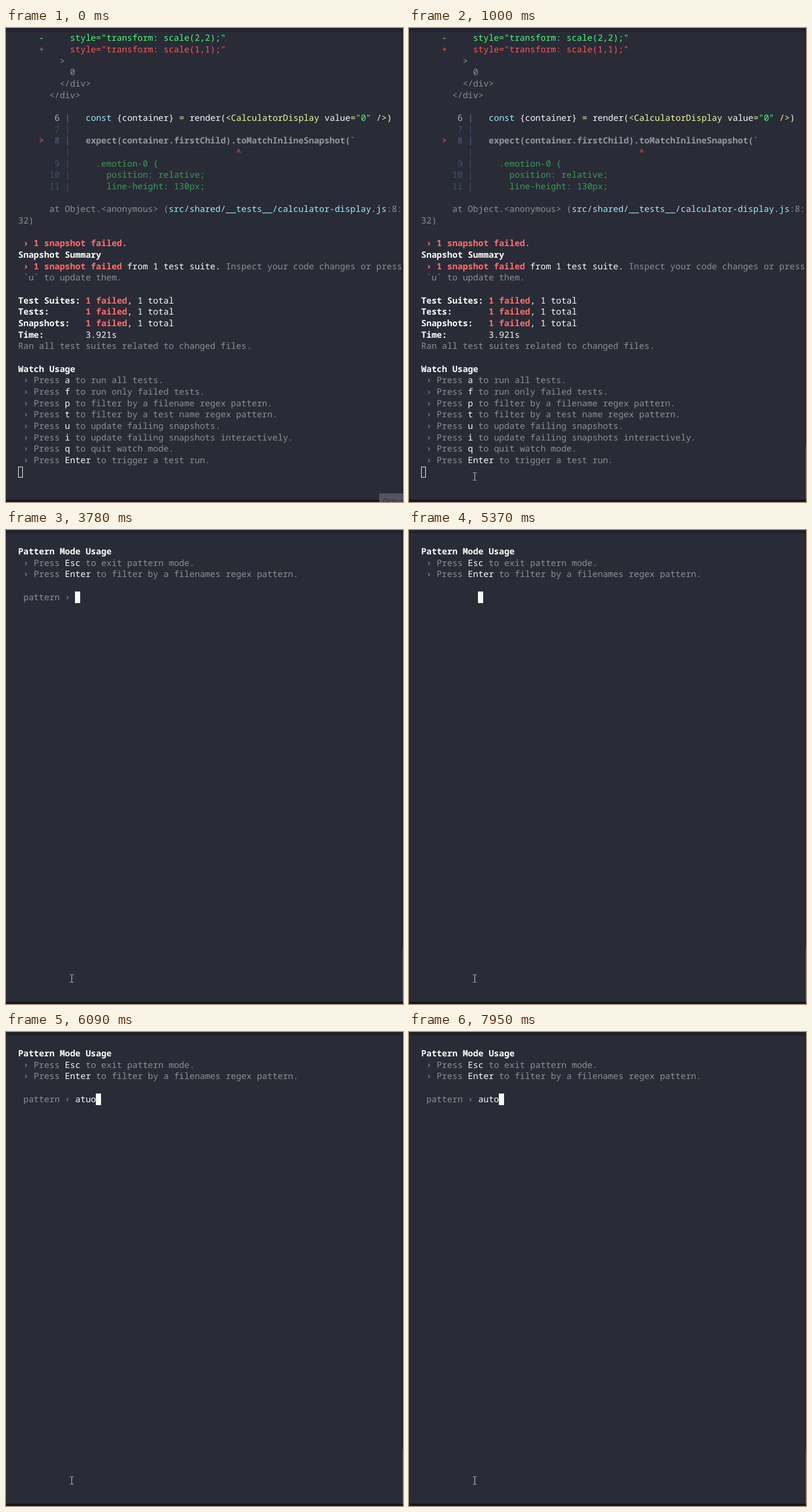
Animation of 685x817 px, one loop 8 s. Source, as an HTML page:

```html
<!DOCTYPE html>
<html lang="en">
<head>
<meta charset="utf-8">
<title>Test watcher</title>
<style>
html, body { margin: 0; width: 100%; height: 100%; overflow: hidden; background: #292b36; }
#stage { position: relative; width: 685px; height: 817px; overflow: hidden; background: #292b36; }
#stage > * { position: absolute; }
pre {
  left: 21px; top: 8.3px; margin: 0; color: #8f9093;
  font: 500 14.93px/19.675px "Noto Sans Mono", "DejaVu Sans Mono", monospace;
  font-variant-ligatures: none; text-rendering: geometricPrecision;
}
i { font-style: normal; color: #fbfbf8; }
b { color: #fff; }
.red { color: #ff5555; }
.fail { color: #ff6e6e; }
.green { color: #50fa7b; }
.leaf { color: #3a9c56; }
.cyan { color: #9aedfe; }
.yellow { color: #f4f99d; }
.mark { color: #b54d4e; }
.grey { color: #97989c; }
.num { color: #aab0c8; }
.dim { color: #434f74; }
.bar { color: #70748a; }
#top { left: 0; top: 0; width: 685px; height: 6px; background: #21222d; }
#right { left: 683px; top: 0; width: 2px; height: 817px; background: #1f202a; }
#bottom { left: 0; top: 813px; width: 685px; height: 4px; background: #181620; }
#thumb { left: 684px; top: 719px; width: 1px; height: 94px; background: #55565f; }
#tip {
  left: 644px; top: 802px; width: 41px; height: 15px; overflow: hidden; box-sizing: border-box;
  background: #54545e; color: #25262e; padding: 4px 0 0 6px;
  font: 13px/18px "Open Sans", sans-serif; white-space: nowrap;
}
#cursor { width: 8.95px; height: 19.675px; box-sizing: border-box; border: 1px solid #f8f8f2; }
#pointer { left: 0; top: 0; }
</style>
</head>
<body>
<div id="stage">
<div id="top"></div>
<pre id="results">
<span class="green">    -     style="transform: scale(2,2);"</span>
<span class="red">    +     style="transform: scale(1,1);"</span>
        &gt;
          0
        &lt;/div&gt;
      &lt;/div&gt;

       <span class="num">6</span> <span class="bar">|</span>   <span class="cyan">const</span> <i>{container}</i> <span class="yellow">=</span> <i>render(</i><span class="yellow">&lt;CalculatorDisplay</span> <i>value</i><span class="yellow">=</span><span class="green">"0"</span> <span class="yellow">/&gt;</span><i>)</i>
<span class="dim">       7 |</span>
    <b class="mark">&gt;</b>  <b class="dim">8 |</b>   <b class="grey">expect(container.firstChild).toMatchInlineSnapshot(</b><b class="leaf">`</b>
<span class="dim">         |</span>                                <b class="mark">^</b>
<span class="dim">       9 |</span>     <span class="leaf">.emotion-0 {</span>
<span class="dim">      10 |</span>       <span class="leaf">position: relative;</span>
<span class="dim">      11 |</span>       <span class="leaf">line-height: 130px;</span>

      at Object.&lt;anonymous&gt; (<span class="cyan">src/shared/__tests__/calculator-display.js</span>:8:
32)

<b class="fail"> › 1 snapshot failed.</b>
<b>Snapshot Summary</b>
<b class="fail"> › 1 snapshot failed</b><i> from 1 test suite.</i> Inspect your code changes or press
 `u` to update them.

<b>Test Suites: <span class="fail">1 failed</span></b><i>, 1 total</i>
<b>Tests:       <span class="fail">1 failed</span></b><i>, 1 total</i>
<b>Snapshots:   <span class="fail">1 failed</span></b><i>, 1 total</i>
<b>Time:        </b><i>3.921s</i>
Ran all test suites related to changed files.

<b>Watch Usage</b>
 › Press <i>a</i> to run all tests.
 › Press <i>f</i> to run only failed tests.
 › Press <i>p</i> to filter by a filename regex pattern.
 › Press <i>t</i> to filter by a test name regex pattern.
 › Press <i>u</i> to update failing snapshots.
 › Press <i>i</i> to update failing snapshots interactively.
 › Press <i>q</i> to quit watch mode.
 › Press <i>Enter</i> to trigger a test run.
</pre>
<pre id="prompt">
&#8203;
<b>Pattern Mode Usage</b>
 › Press <i>Esc</i> to exit pattern mode.
 › Press <i>Enter</i> to filter by a filenames regex pattern.

<span id="entry"> pattern › <i id="typed"></i></span>
</pre>
<div id="cursor"></div>
<div id="right"></div>
<div id="thumb"></div>
<div id="bottom"></div>
<div id="tip">Gravar</div>
<svg id="pointer" width="7" height="14" fill="none" stroke="#d6d6da">
  <path d="M0.5 .5H2.5L3.5 1.5L4.5 .5H6.5M3.5 1V13M0.5 13.5H2.5L3.5 12.5L4.5 13.5H6.5"/>
</svg>
</div>
<script>
const LOOP = 8000, FOCUS = 1660, PROMPT = 3780;
const MOVE = { start: 520, end: 1000, steps: 7 };
const CELL = 8.95, ROW = 19.675, LEFT = 20.5, TOP = 8;

// Each keystroke: time, resulting text, and how long the line is blank while redrawn.
const KEYS = [
  [PROMPT, "", 0], [5370, "a", 60], [5630, "at", 60], [5830, "atu", 0], [6020, "atuo", 70],
  [6620, "atu", 0], [6750, "at", 0], [6880, "a", 0],
  [7480, "au", 0], [7680, "aut", 70], [7950, "auto", 0],
];

const $ = id => document.getElementById(id);
const show = (id, on) => { $(id).style.visibility = on ? "visible" : "hidden"; };

function placeCursor(column, row, solid) {
  const style = $("cursor").style;
  style.left = LEFT + column * CELL + "px";
  style.top = TOP + row * ROW + "px";
  style.background = solid ? "#f8f8f2" : "none";
}

function placePointer(time) {
  const progress = Math.min(1, (time - MOVE.start) / (MOVE.end - MOVE.start));
  const step = Math.floor(progress * MOVE.steps + 1e-6) / MOVE.steps;
  const rest = (1 - step) ** 2;
  const x = Math.round(110 + 540 * rest), y = Math.round(766 + 38 * rest);
  $("pointer").style.transform = `translate(${x}px, ${y}px)`;
}

function draw(time) {
  const prompting = time >= PROMPT;
  show("results", !prompting);
  show("prompt", prompting);
  show("entry", prompting);
  show("tip", time < 70);
  show("pointer", time >= MOVE.start);
  show("thumb", time >= MOVE.start);
  placePointer(time);

  if (!prompting) {
    placeCursor(0, 38, time >= FOCUS);
    return;
  }
  const index = KEYS.findLastIndex(([at]) => time >= at);
  const [at, text, blank] = KEYS[index];
  const redrawing = time < at + blank;
  const shown = redrawing ? KEYS[index - 1][1] : text;
  show("entry", !redrawing);
  $("typed").textContent = shown;
  placeCursor(11 + shown.length, 5, true);
}

const origin = performance.now();
function tick() {
  draw((performance.now() - origin) % LOOP);
  requestAnimationFrame(tick);
}
tick();
</script>
</body>
</html>
```
